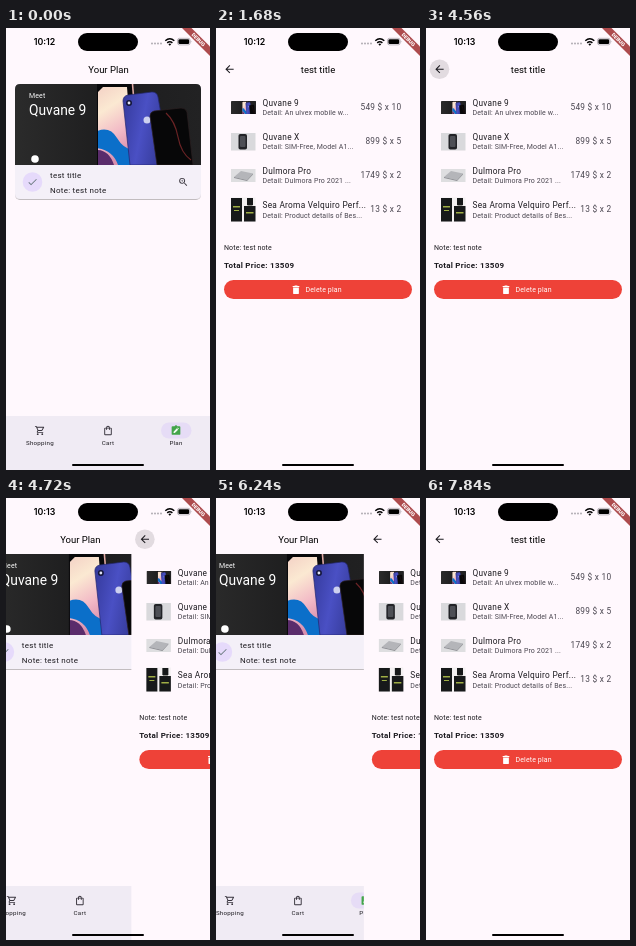
An HTML page that plays this animation: 204x442 px, repeating every 8000 ms.

```html
<!DOCTYPE html>
<html lang="en">
<head>
<meta charset="utf-8">
<title>Shopping plan</title>
<style>
html, body { margin: 0; width: 100%; height: 100%; overflow: hidden; background: #fff8fd; }
svg { display: block; width: 100vw; height: 100vh; }
text { font: 8px Roboto, Arial, sans-serif; fill: #1d1b20; letter-spacing: .26px; white-space: pre; }
.title { font-size: 9.5px; letter-spacing: 0; text-anchor: middle; fill: #000; }
.item { font-size: 8.3px; }
.small { font-size: 7px; letter-spacing: .13px; }
.soft { fill: #49454f; }
.bold { font-weight: 700; }
.white { fill: #fff; }
.end { text-anchor: end; }
.nav { font-size: 6.2px; text-anchor: middle; }
.headline { font-size: 13.8px; letter-spacing: 0; fill: #fff; }
.clock { font: 600 8.8px Inter, Roboto, sans-serif; letter-spacing: 0; text-anchor: middle; fill: #000; }
.debug { font-size: 5.2px; font-weight: 900; letter-spacing: 0; text-anchor: middle; fill: #fff; }
</style>
</head>
<body>
<svg viewBox="0 0 204 442">
  <defs>
    <linearGradient id="dark"><stop stop-color="#2b2b2b"/><stop offset=".5" stop-color="#1d1d1e"/><stop offset="1" stop-color="#222223"/></linearGradient>
    <linearGradient id="blue" x2="1" y2=".3"><stop stop-color="#34399a"/><stop offset=".5" stop-color="#4a50c4"/><stop offset="1" stop-color="#343996"/></linearGradient>
    <linearGradient id="screen" x2=".3" y2="1"><stop stop-color="#f3cfc4"/><stop offset=".35" stop-color="#fbe9d2"/><stop offset=".7" stop-color="#f2b9c6"/><stop offset="1" stop-color="#d98fae"/></linearGradient>
    <filter id="shadow" x="-5%" y="-5%" width="110%" height="112%"><feDropShadow dx="0" dy=".7" stdDeviation=".7" flood-opacity=".35"/></filter>
    <clipPath id="cardTop"><path d="M0 81V5Q0 0 5 0H181Q186 0 186 5V81Z"/></clipPath>
    <clipPath id="glass"><path d="M83 8L88 3H112L118 81H83Z"/></clipPath>
    <g id="photo" clip-path="url(#cardTop)">
      <path fill="url(#dark)" d="M0 0H186V81H0Z"/>
      <path fill="#08080a" d="M82 0H118L124 81H82Z"/>
      <g clip-path="url(#glass)">
        <path fill="url(#screen)" d="M82 0H120V81H82Z"/>
        <path fill="#0b6fc9" d="M82 47Q95 42 102 54T120 66V81H103Q98 66 82 64Z"/>
        <path fill="#5a2c6b" d="M82 66Q94 66 99 81H82Z"/>
      </g>
      <path fill="none" stroke="#e0aaa4" stroke-width="1.6" d="M117.500 0L118.500 12"/>
      <path fill="url(#blue)" stroke="#23276f" stroke-width=".7" d="M108 17Q108 12 113 11L137 8Q142 8 143 13L155 81H115Z"/>
      <circle cx="114" cy="19" r="3" fill="#14163a"/>
      <circle cx="114" cy="19" r="1.400" fill="#dfe2f4"/>
      <circle cx="132" cy="36" r="3.500" fill="#cdd1ef"/>
      <path fill="#070708" stroke="#2c2022" stroke-width=".7" d="M135 32Q135 28 139 27L166 24Q171 24 172 28L178 81H142Z"/>
      <path fill="none" stroke="#6b2325" stroke-width="1.200" d="M151 29Q160 37 163 53T176 76"/>
    </g>
  </defs>

  <g id="plan"></g>
  <g id="detail"></g>

  <rect x="72" y="5" width="60" height="18" rx="9"/>
  <text id="clock" class="clock" x="38.5" y="17.2"></text>
  <g fill="#a9a4ab"><circle cx="146" cy="15.5" r=".9"/><circle cx="149" cy="15.5" r=".9"/><circle cx="152" cy="15.5" r=".9"/><circle cx="155" cy="15.5" r=".9"/></g>
  <g fill="none" stroke="#000" stroke-width="1.5"><path d="M159.3 12.8Q163.8 8.8 168.3 12.8"/><path d="M161.2 14.9Q163.8 12.6 166.4 14.9"/></g>
  <path d="M162.4 16.2Q163.8 15 165.2 16.2L163.8 17.7Z"/>
  <rect x="171.5" y="10.3" width="12.6" height="6.6" rx="2" fill="none" stroke="#8f8a92" stroke-width=".6"/>
  <rect x="172.4" y="11.2" width="10.8" height="4.8" rx="1.3"/>
  <path d="M184.9 12.5q1 1.1 0 2.2z" fill="#8f8a92"/>
  <path d="M176 0H185.5L204 18.5V28Z" fill="#ad4b4d"/>
  <text class="debug" transform="translate(192.4 11.6) rotate(45)" y="1.8">DEBUG</text>
  <rect x="66" y="436" width="72" height="2" rx="1"/>
</svg>
<script>
const $ = id => document.getElementById(id);
const text = (x, y, cls, s) => `<text x="${x}" y="${y}" class="${cls}">${s}</text>`;
// Icons are drawn on a 24-unit grid and centred on (x, y).
const icon = (x, y, color, d, size = 12.45) =>
  `<path fill="${color}" fill-rule="evenodd" transform="translate(${x} ${y}) scale(${size / 24}) translate(-12 -12)" d="${d}"/>`;
const paths = {
  back: 'M20 11H7.83l5.59-5.59L12 4l-8 8 8 8 1.41-1.41L7.83 13H20z',
  check: 'M9 16.17 4.83 12l-1.42 1.41L9 19 21 7l-1.41-1.41z',
  zoom: 'M15.5 14h-.79l-.28-.27A6.47 6.47 0 0 0 16 9.5 6.5 6.5 0 1 0 9.5 16c1.61 0 3.09-.59 4.23-1.57l.27.28v.79l5 4.99L20.49 19zM9.5 14a4.5 4.5 0 1 1 0-9 4.5 4.5 0 0 1 0 9zM10 7H9v2H7v1h2v2h1v-2h2V9h-2z',
  cart: 'M15.55 13c.75 0 1.41-.41 1.75-1.03l3.58-6.49A1 1 0 0 0 20 4H5.21l-.94-2H1v2h2l3.6 7.59-1.35 2.44C4.52 15.37 5.48 17 7 17h12v-2H7l1.1-2zM6.16 6h12.15l-2.76 5H8.53zM7 18a2 2 0 1 0 0 4 2 2 0 0 0 0-4zM17 18a2 2 0 1 0 0 4 2 2 0 0 0 0-4z',
  bag: 'M18 6h-2a4 4 0 0 0-8 0H6a2 2 0 0 0-2 2v12a2 2 0 0 0 2 2h12a2 2 0 0 0 2-2V8a2 2 0 0 0-2-2zM12 4a2 2 0 0 1 2 2h-4a2 2 0 0 1 2-2zM18 20H6V8h2v2a1 1 0 0 0 2 0V8h4v2a1 1 0 0 0 2 0V8h2z',
  board: 'M19 3h-4.18a3 3 0 0 0-5.64 0H5a2 2 0 0 0-2 2v14a2 2 0 0 0 2 2h14a2 2 0 0 0 2-2V5a2 2 0 0 0-2-2z',
  pencil: 'M7 17v-2.6l6.8-6.8 2.6 2.6L9.6 17zM14.6 6.8l1-1 2.6 2.6-1 1z',
  trash: 'M6 19a2 2 0 0 0 2 2h8a2 2 0 0 0 2-2V7H6zM19 4h-3.5l-1-1h-5l-1 1H5v2h14z'
};
const page = '<rect width="204" height="442" fill="#fff8fd"/>';

$('plan').innerHTML = page + text(102.5, 45, 'title', 'Your Plan') +
  `<rect x="9" y="56" width="186" height="115" rx="5" fill="#f4f0f8" filter="url(#shadow)"/>
   <use href="#photo" x="9" y="56"/>
   <circle cx="29" cy="131" r="3.8" fill="#fff"/>` +
  text(23, 70, 'small white', 'Meet') + text(23, 87, 'headline', 'Quvane 9') +
  '<circle cx="26.5" cy="154" r="9.8" fill="#e6dafb"/>' +
  icon(26.5, 154, '#6b7a80', paths.check, 11.5) +
  text(44, 149.5, '', 'test title') + text(44, 164.5, '', 'Note: test note') +
  icon(177.3, 154, '#37333c', paths.zoom, 11) +
  `<rect y="388" width="204" height="54" fill="#f0ebf4"/>
   <rect x="155" y="394.5" width="30.5" height="16" rx="8" fill="#e6dcf6"/>` +
  icon(34, 402.5, '#37333c', paths.cart, 11) + icon(102, 402.5, '#37333c', paths.bag, 11.3) +
  icon(170, 402.5, '#43a54a', paths.board, 11.6) + icon(170, 402.5, '#f2fbf2', paths.pencil, 11.6) +
  ['Shopping', 'Cart', 'Plan'].map((s, i) => text(34 + 68 * i, 417.3, 'nav', s)).join('');

const items = [
  ['Quvane 9', 'An ulvex mobile w...', '549 $ x 10',
    '<use href="#photo" transform="translate(15 73) scale(.135 .16)"/>'],
  ['Quvane X', 'SIM-Free, Model A1...', '899 $ x 5',
    `<rect x="15" y="105" width="24.5" height="17.5" fill="#d9d9dc"/>
     <rect x="22.5" y="106" width="8.5" height="15.5" rx="1.8" fill="#222327"/>
     <rect x="24" y="108" width="5.5" height="11" rx="1" fill="#4d4f55"/>`],
  ['Dulmora Pro', 'Dulmora Pro 2021 ...', '1749 $ x 2',
    `<rect x="15" y="141" width="24.5" height="13" fill="#dedee0"/>
     <path d="M18 149L25 143L37 145.5L31 152Z" fill="#b4b5b9"/>
     <path d="M18 149L31 152L37 145.5V146.5L31 153L18 150Z" fill="#8e8f94"/>`],
  ['Sea Aroma Velquiro Perf...', 'Product details of Bes...', '13 $ x 2',
    `<rect x="15" y="169.5" width="24.5" height="24.5" fill="#f4f1f2"/>
     <path d="M15 170H26V193.5H15ZM28 178H39.5V193.5H28ZM31 170H37V177H31Z" fill="#17191a"/>
     <path d="M17 178H24V179.5H17ZM18 182H23V183H18ZM30 184H37.5V185.5H30Z" fill="#9fae45"/>
     <path d="M31.5 177H36.5V178H31.5Z" fill="#8d8d88"/>`]
];
$('detail').innerHTML = page +
  '<circle id="ripple" cx="13.5" cy="41.2" r="9.8" fill="#1d1b20"/>' +
  icon(13.5, 41.2, '#1d1b20', paths.back) + text(102, 45, 'title', 'test title') +
  items.map(([name, info, price, thumb], i) => {
    const y = 77.6 + 34.2 * i;
    return thumb + text(46.5, y, 'item', name) +
      text(46.5, y + 9.4, 'small soft', 'Detail: ' + info) +
      text(185.4, y + 4.2, 'item soft end', price);
  }).join('') +
  text(8, 222, 'small', 'Note: test note') + text(8, 240.3, 'bold', 'Total Price: 13509') +
  '<rect x="8" y="252" width="188" height="19" rx="9.5" fill="#ee4238"/>' +
  icon(80, 261.8, '#fff', paths.trash, 11.5) + text(89.5, 264.3, 'small white', 'Delete plan');

const ease = u => 1 - (1 - Math.min(1, Math.max(0, u)) ** 1.42) ** 3;

// How far the detail page has come in: 0 hidden, 1 in place.
function progress(t) {
  if (t < 4560) return ease((t - 1360) / 320);
  if (t < 6240) return 1 - ease((t - 4560) / 400);
  return ease(t < 7600 ? .2 : (t - 7440) / 400); // the second push stalls early on
}

function draw(now) {
  const t = Math.floor(now % 8000 / 80) * 80;
  const p = progress(t);
  $('plan').setAttribute('transform', `translate(${-73 * p})`);
  $('detail').setAttribute('transform', `translate(${204 * (1 - p)})`);
  $('ripple').setAttribute('opacity', t < 4480 || t > 4800 ? 0 : t < 4560 ? .06 : .13);
  $('clock').textContent = t < 2320 ? '10:12' : '10:13';
}

const start = performance.now();
function tick() {
  draw(performance.now() - start);
  requestAnimationFrame(tick);
}
tick();
</script>
</body>
</html>
```
